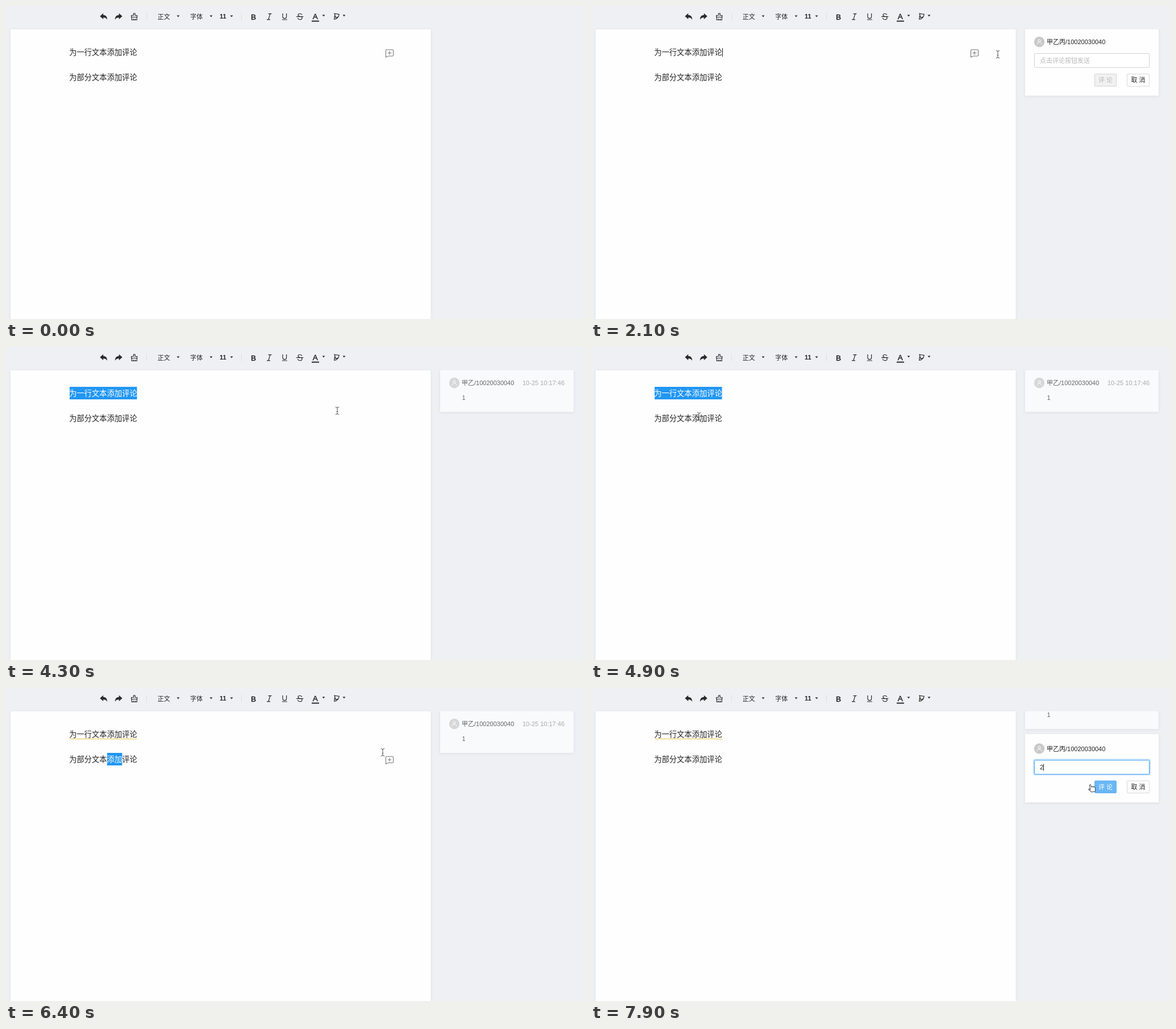
Recreate the animation shown at these times as an HTML page. Size 1019 by 550 pixels, loop 8000 ms.

```html
<!DOCTYPE html>
<html lang="zh-CN">
<head>
<meta charset="utf-8">
<style>
  html, body { margin: 0; width: 100%; height: 100%; overflow: hidden; background: #eff0f4; }
  svg { display: block; width: 1019px; height: 550px; }
  text { font: 11px "Liberation Sans", "Noto Sans CJK SC", "Noto Sans CJK", sans-serif; fill: #222; white-space: pre; }
  .doc { font-size: 13.3px; }
  .medium { font-weight: 500; }
  .icon { fill: none; stroke: #2b2b2b; stroke-width: 1.2; }
  .muted { fill: #666; }
  .btn { text-anchor: middle; font-weight: 500; }
</style>
</head>
<body>
<svg viewBox="0 0 1019 550">
  <defs>
    <filter id="soft" x="-10%" y="-10%" width="120%" height="130%">
      <feDropShadow dx="0" dy="1" stdDeviation="2" flood-color="#555" flood-opacity=".13"/>
    </filter>
    <clipPath id="below"><path d="M748 41H1019V550H748Z"/></clipPath>
    <g id="avatar">
      <circle cx="789" cy="63" r="9.2" fill="#c9c9c9"/>
      <g fill="none" stroke="#fff"><circle cx="789" cy="61" r="2.2"/><path d="M785 67.5c.4-5.2 7.6-5.2 8 0"/></g>
    </g>
  </defs>
  <rect width="1019" height="550" fill="#eff0f4"/>

  <g id="toolbar">
    <g fill="#2b2b2b">
      <path id="undo" d="M165.3 18L171.2 12.8V16C175.5 16 178 18.6 178.2 24C176.4 21 174.4 20.2 171.2 20.2V23.3Z"/>
      <path d="M204.7 18L198.8 12.8V16C194.5 16 192 18.6 191.8 24C193.6 21 195.6 20.2 198.8 20.2V23.3Z"/>
      <rect x="538" y="25.6" width="13" height="2"/>
    </g>
    <g class="icon">
      <path d="M224.5 16.5V13h2.6v3.5h3.6v3h-10v-3h3.8M221.3 19.5v5h9v-5M224.2 24.5v-2.6M227.3 24.5v-2.6"/>
      <path d="M461.5 13.6h6M459 23.8h6M465 13.6l-3.2 10.2"/>
      <path d="M487 13v5.5a3.3 3.3 0 0 0 6.6 0V13M485.8 24h9"/>
      <path d="M520.7 15.6c-.7-2.9-6.7-2.8-6.7.2 0 1.6 1.6 2.2 3.2 2.6M513.6 21c.5 3.6 7.5 3.7 7.5.3 0-1-.5-1.8-1.4-2.3M511 18.6h12.4"/>
      <path d="M578 13.3l8.2 1.1-1.2 4.7-4.8 1.3zM578.4 17l-.6 6.3 3.2-.6 3.6-3.2"/>
    </g>
    <path d="M247.5 12v13M414.5 12v13" stroke="#dddfe3"/>
    <text class="medium" x="266.7" y="22.5">正文</text>
    <text class="medium" x="324.3" y="22.5">字体</text>
    <text x="376" y="22.4" font-weight="600" style="font-weight:600">11</text>
    <text x="431" y="23.5" style="font-size:13.5px;stroke:#222;stroke-width:.5">B</text>
    <text x="539.8" y="23" style="font-size:13.5px;stroke:#222;stroke-width:.4">A</text>
  </g>

  <rect x="8" y="41" width="739.5" height="520" fill="#fefefe" filter="url(#soft)"/>
  <rect id="pick1" x="112" y="70" width="118.5" height="22" fill="#2196f3"/>
  <rect id="pick2" x="178" y="114" width="26.4" height="22" fill="#2196f3"/>
  <text id="line1" class="doc" x="111.2" y="86">为一行文本添加评论</text>
  <text class="doc" x="111.2" y="129.5">为部分文本<tspan id="word">添加</tspan>评论</text>
  <path id="underline" d="M112 89.5h118.5" stroke="#efd27c" stroke-width="1.4"/>
  <path id="caret" stroke="#222"/>

  <g id="addNote" fill="none" stroke="#777" stroke-width="1.1">
    <path d="M670 76.8h10q1.6 0 1.6 1.6v8q0 1.6-1.6 1.6h-7.2l-4.3 2V78.4q0-1.6 1.5-1.6zM675 79.3v6.4M671.8 82.5h6.4"/>
  </g>

  <g clip-path="url(#below)">
    <g id="posted">
      <rect x="764" y="37.5" width="235" height="76.5" fill="#f9fafc" filter="url(#soft)"/>
      <use href="#avatar" opacity=".7"/>
      <text class="medium muted" x="802" y="67">甲乙/10020030040</text>
      <text x="909" y="67" fill="#aaa" style="fill:#aaa">10-25 10:17:46</text>
      <text class="muted" x="802.5" y="93.3">1</text>
    </g>
    <g id="editor">
      <rect x="764" y="37.5" width="235" height="120" fill="#fefefe" filter="url(#soft)"/>
      <use href="#avatar"/>
      <text class="medium" x="802" y="67">甲乙丙/10020030040</text>
      <rect id="glow" x="779" y="82" width="205" height="27" rx="3" fill="none" stroke="#bfe0fb" stroke-width="2"/>
      <rect id="field" x="780.5" y="83.5" width="202" height="24.5" rx="1.5" fill="#fff"/>
      <text id="entry" x="790" y="99.7"></text>
      <path id="entryCaret" stroke="#222"/>
      <g id="send">
        <rect id="sendBox" x="886.5" y="119.5" width="38" height="21.5" rx="1.5"/>
        <text id="sendText" class="btn" x="905.5" y="134">评 论</text>
      </g>
      <rect x="943.5" y="119.5" width="39" height="21.5" rx="1.5" fill="#fff" stroke="#d6d6d6"/>
      <text class="btn" x="963" y="134">取 消</text>
    </g>
  </g>

  <g id="cursor">
    <path id="beam" d="M-3.2-6.5Q0-6.5 0-4.5Q0-6.5 3.2-6.5M0-4.5V4.5M-3.2 6.5Q0 6.5 0 4.5Q0 6.5 3.2 6.5M-1.3 1.5H1.3" fill="none"/>
    <path id="hand" d="M-2.6 2V-5.4a1.2 1.2 0 0 1 2.4 0V-1.6a1.1 1.1 0 0 1 2.2 0v.4a1.1 1.1 0 0 1 2.1 0v.5a1 1 0 0 1 2 .2V3Q6 5 4.8 6.8H-1.2L-5.4 1.7Q-6 .2-4.4.3Z"
      fill="#fff" stroke="#444" transform="rotate(-13)"/>
  </g>
</svg>
<script>
const LOOP = 8000, ROW = 43.5;
const $ = id => document.getElementById(id);
const set = (id, attrs) => { for (const k in attrs) $(id).setAttribute(k, attrs[k]); };
const show = (id, on) => set(id, { visibility: on ? 'visible' : 'hidden' });
const paint = (id, color) => { $(id).style.fill = color; };

// Pointer path: time, x, y
const path = [
  [300, 386, 268], [400, 386, 236], [500, 386, 236], [900, 242, 84], [1000, 242, 84],
  [1400, 682, 92], [1500, 685, 95], [2000, 685, 95], [2100, 716, 85], [2600, 860, 97],
  [2900, 866, 98], [3100, 866, 98], [3300, 880, 110], [3500, 931, 132], [3700, 908, 131],
  [3900, 908, 131], [4000, 820, 125], [4100, 750, 120], [4300, 583, 112], [4800, 196, 124],
  [4900, 190, 122], [5700, 190, 122], [6400, 663, 113], [6600, 680, 128], [7000, 680, 128],
  [7400, 860, 140], [7600, 860, 140], [7900, 881, 176]
];

for (const [x, y] of [[303, 18], [361, 18], [397, 18], [559, 17], [595, 17]]) {
  const arrow = document.createElementNS('http://www.w3.org/2000/svg', 'path');
  arrow.setAttribute('d', `M${x - 2.5} ${y - 1.4}h5l-2.5 3z`);
  arrow.setAttribute('fill', '#2b2b2b');
  $('toolbar').append(arrow);
}

function pointerAt(t) {
  const next = path.findIndex(p => p[0] > t);
  if (next < 0) return path[path.length - 1].slice(1);
  if (next === 0) return path[0].slice(1);
  const [t0, x0, y0] = path[next - 1], [t1, x1, y1] = path[next];
  const k = (t - t0) / (t1 - t0);
  return [x0 + (x1 - x0) * k, y0 + (y1 - y0) * k];
}

function render(now) {
  const t = Math.floor((now % LOOP) / 100) * 100;
  const within = (a, b) => t >= a && t < b;

  const second = t >= 6800;
  const focused = within(2600, 3900) || t >= 7400;
  const typed = within(3300, 3900) ? '1' : t >= 7600 ? '2' : '';
  const wordPicked = within(5200, 7400);

  show('pick1', within(3900, 5000));
  paint('line1', within(3900, 5000) ? '#fff' : '#222');
  show('underline', t >= 5000);
  show('pick2', wordPicked);
  paint('word', wordPicked ? '#fff' : '#222');
  show('caret', within(900, 2600) || within(5000, 5200));
  set('caret', { d: t < 5000 ? 'M231.5 74v15' : 'M191.5 117.5v15' });
  show('addNote', t < 2600 || wordPicked);
  set('addNote', { transform: `translate(0 ${t < 5000 ? 0 : ROW})` });

  show('posted', t >= 3900);
  set('posted', { transform: `translate(0 ${second ? -42 : 0})` });

  const open = within(1800, 3900) || second;
  set('editor', { display: open ? 'inline' : 'none', transform: `translate(0 ${second ? ROW : 0})` });
  set('glow', { visibility: focused ? 'inherit' : 'hidden' });
  set('field', { stroke: focused ? '#44a5f5' : '#d2d2d2' });
  $('entry').textContent = typed || (focused ? '' : '点击评论按钮发送');
  paint('entry', typed ? '#222' : '#b8b8b8');
  set('entryCaret', {
    visibility: focused ? 'inherit' : 'hidden',
    d: `M${typed ? 796.5 : 790.5} 90v12`
  });
  set('sendBox', { fill: typed ? '#2395f3' : '#f1f1f1', stroke: typed ? '#2395f3' : '#d4d4d4' });
  paint('sendText', typed ? '#fff' : '#b8b8b8');
  set('send', { opacity: within(3600, 3900) || t >= 7900 ? .68 : 1 });

  const [x, y] = pointerAt(t);
  const hand = within(1400, 2100) || within(3400, 4000) || within(6600, 7100) || t >= 7800;
  set('cursor', { transform: `translate(${x} ${y})` });
  show('hand', t >= 300 && hand);
  show('beam', t >= 300 && !hand);
  set('beam', { stroke: wordPicked && x < 205 ? '#cfe6fb' : '#555' });
}

const start = performance.now();
function tick() {
  render(performance.now() - start);
  requestAnimationFrame(tick);
}
tick();
</script>
</body>
</html>
```
